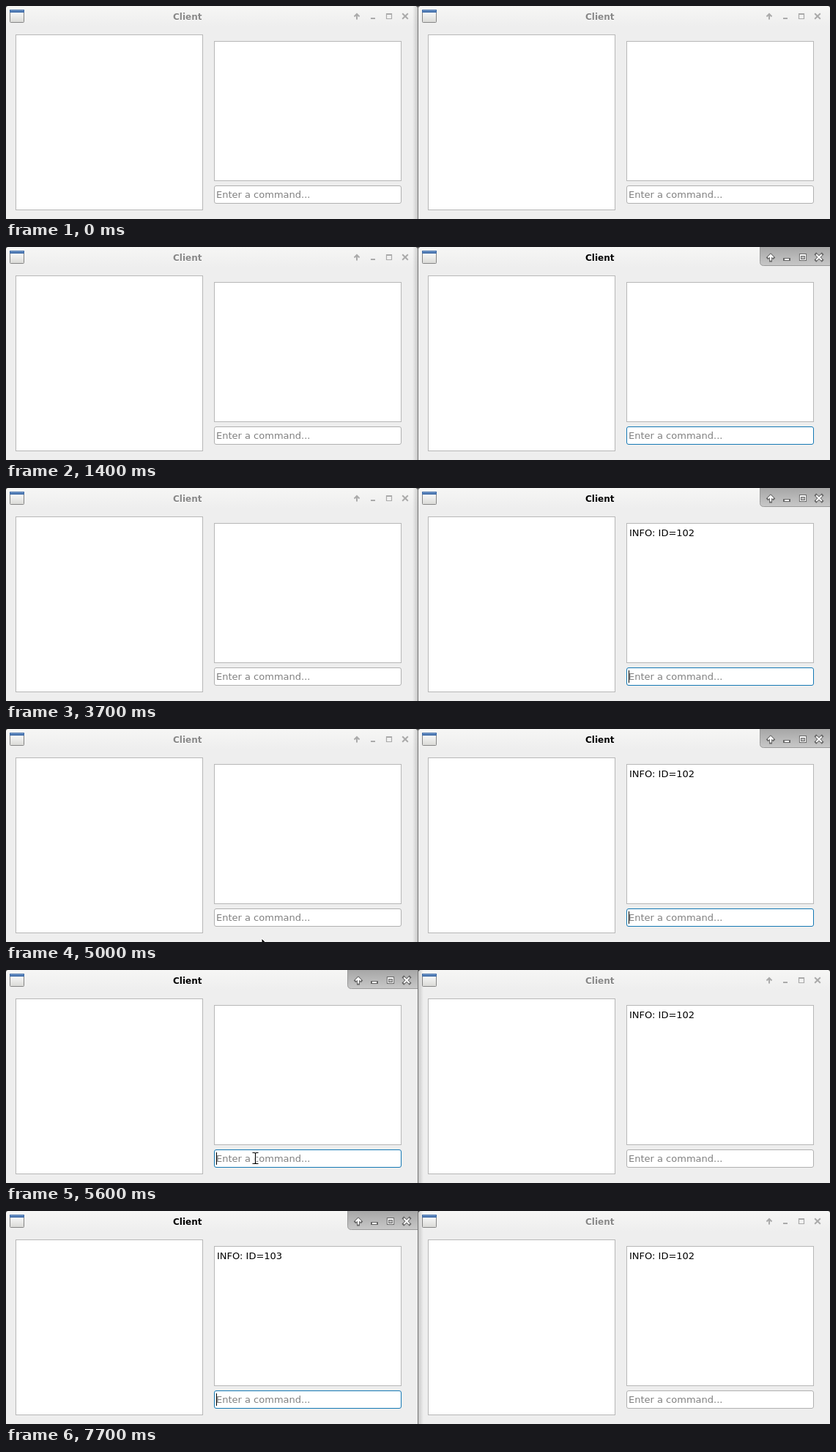
These frames come from a looping animation (1125 by 292 pixels, 8 s). An HTML page:

```html
<!DOCTYPE html>
<html lang="en">
<head>
<meta charset="utf-8">
<title>Two clients</title>
<style>
  html, body { margin: 0; width: 100%; height: 100%; overflow: hidden; background: #eee; }
  svg { display: block; width: 1125px; height: 292px; }
  text { font: 13px "DejaVu Sans", sans-serif; white-space: pre; }
  .title { font-weight: bold; font-size: 12px; }
</style>
</head>
<body>
<svg id="stage" viewBox="0 0 1125 292" xmlns="http://www.w3.org/2000/svg">
  <defs>
    <linearGradient id="bar" x2="0" y2="1">
      <stop offset="0" stop-color="#f6f6f5"/><stop offset="1" stop-color="#eee"/>
    </linearGradient>
    <linearGradient id="tab" x2="0" y2="1">
      <stop offset="0" stop-color="#a6a6a6"/><stop offset="1" stop-color="#c8c8c8"/>
    </linearGradient>
    <linearGradient id="pane" x2="0" y2="1">
      <stop offset="0" stop-color="#fff"/><stop offset="1" stop-color="#d9d9d6"/>
    </linearGradient>
    <linearGradient id="shade">
      <stop offset="0" stop-color="#000" stop-opacity=".16"/><stop offset="1" stop-color="#000" stop-opacity="0"/>
    </linearGradient>
  </defs>
  <rect width="1125" height="292" fill="#4c4c4c"/>
</svg>
<script>
const LOOP = 8000, STEP = 100, WINDOW_X = 563;
const stage = document.getElementById('stage');

function add(parent, tag, attrs, content) {
  const node = document.createElementNS('http://www.w3.org/2000/svg', tag);
  for (const key in attrs) node.setAttribute(key, attrs[key]);
  if (content) node.textContent = content;
  parent.appendChild(node);
  return node;
}

const show = (node, on) => node.setAttribute('visibility', on ? 'visible' : 'hidden');
const inside = (t, spans) => spans.some(([from, to]) => t >= from && t < to);

function drawButtons(parent, x, color, active) {
  const group = add(parent, 'g', { transform: `translate(${x} 14)` });
  const shapes = [
    'M0 4.5V-2.5M-3.5 0.5L0 -3L3.5 0.5',
    'M19 3H25',
    'M40.5 -3.5H47.5V3.5H40.5ZM40.5 -2.5H47.5',
    'M62.2 -3.8L69.8 3.8M69.8 -3.8L62.2 3.8'
  ];
  shapes.forEach((d, i) => {
    const width = i === 2 ? 1.2 : 2;
    if (active) add(group, 'path', { d, fill: 'none', stroke: '#686868', 'stroke-width': width + 2, 'stroke-linecap': 'square' });
    add(group, 'path', { d, fill: 'none', stroke: color, 'stroke-width': width });
  });
}

function drawBox(parent, x, y, width, height, radius, stroke) {
  return add(parent, 'rect', { x: x + .5, y: y + .5, width: width - 1, height: height - 1, rx: radius, fill: '#fff', stroke });
}

function createWindow(x) {
  const g = add(stage, 'g', { transform: `translate(${x} 0)` });
  add(g, 'path', { d: 'M0 292V4Q0 0 4 0H558Q562 0 562 4V292Z', fill: '#eee' });
  add(g, 'path', { d: 'M0 28V4Q0 0 4 0H558Q562 0 562 4V28Z', fill: 'url(#bar)' });

  add(g, 'rect', { x: 5.5, y: 5.5, width: 19, height: 17, rx: 1, fill: 'url(#pane)', stroke: '#858585' });
  add(g, 'rect', { x: 5, y: 5, width: 20, height: 4, fill: '#3f6ca8' });
  add(g, 'rect', { x: 6, y: 6, width: 18, height: 1, fill: '#7fa3d1' });

  add(g, 'text', { class: 'title', x: 228, y: 20, fill: '#fff' }, 'Client');
  const title = add(g, 'text', { class: 'title', x: 228, y: 19 }, 'Client');

  const idle = add(g, 'g', {});
  drawButtons(idle, 479, '#aaa', false);
  const active = add(g, 'g', {});
  add(active, 'path', { d: 'M466.5 0V20.500Q466.500 25.500 471.500 25.500H562V0Z', fill: 'url(#tab)' });
  add(active, 'path', { d: 'M466.5 0V20.500Q466.500 25.500 471.500 25.500H562', fill: 'none', stroke: '#9a9a9a' });
  drawButtons(active, 481, '#fff', true);

  drawBox(g, 13, 39, 256, 241, 0, '#b7b7b7');
  drawBox(g, 284, 48, 256, 192, 0, '#b7b7b7');
  const log = add(g, 'text', { x: 288, y: 66 });
  const field = drawBox(g, 284, 246, 256, 25, 2.5, '#b0b0b0');
  const hint = add(g, 'text', { x: 287, y: 263, fill: '#808080' }, 'Enter a command...');
  const typed = add(g, 'text', { x: 287, y: 263 });
  const caret = add(g, 'rect', { y: 250, width: 1, height: 17 });

  return state => {
    title.setAttribute('fill', state.focus ? '#000' : '#888');
    show(idle, !state.focus);
    show(active, state.focus);
    field.setAttribute('stroke', state.focus ? '#1478b4' : '#b0b0b0');
    log.textContent = state.log;
    typed.textContent = state.typed;
    show(hint, !state.typed);
    show(caret, state.caret);
    caret.setAttribute('x', 287 + [0, 4, 14, 21, 31][state.typed.length]);
  };
}

const updateLeft = createWindow(0);
const updateRight = createWindow(WINDOW_X);
const shadeLeft = add(stage, 'rect', { x: -562, width: 7, height: 292, fill: 'url(#shade)', transform: 'scale(-1 1)' });
const shadeRight = add(stage, 'rect', { x: 563, width: 7, height: 292, fill: 'url(#shade)' });
add(stage, 'rect', { x: 562, width: 1, height: 292, fill: '#747474' });

const beam = add(stage, 'g', {});
const beamPath = 'M-3.5 -7.500H-1Q.5 -7.500 .5 -6V6Q.5 7.500 -1 7.500H-3.500M4.500 -7.500H2Q.5 -7.500 .5 -6M.5 6Q.5 7.500 2 7.500H4.500';
add(beam, 'path', { d: beamPath, fill: 'none', stroke: '#fff', 'stroke-width': 2.6 });
add(beam, 'path', { d: beamPath, fill: 'none', stroke: '#000', 'stroke-width': 1.1 });
const arrow = add(stage, 'path', { d: 'M0 0V15L3.500 11.800L6 17.500L8.500 16.400L6 11H11Z', fill: '#000', stroke: '#fff' });

// Each visit glides in, rests over the field, then drops out below.
const visits = [
  { start: 200, arrive: 600, leave: 900, end: 1000, from: [905, 288], rest: [896, 263], exit: [896, 287] },
  { start: 5000, arrive: 5400, leave: 5800, end: 5900, from: [349, 287], rest: [340, 258], exit: [341, 276] }
];

function pointerAt(t) {
  const visit = visits.find(v => t >= v.start && t < v.end);
  if (!visit) return null;
  if (t >= visit.leave) return visit.exit;
  const p = Math.min(1, (t - visit.start) / (visit.arrive - visit.start));
  const eased = 1 - (1 - p) ** 2;
  return visit.from.map((a, i) => Math.round(a + (visit.rest[i] - a) * eased));
}

function typedAt(t, keys, enter) {
  return t < enter ? 'INFO'.slice(0, keys.filter(time => t >= time).length) : '';
}

function render(time) {
  const t = Math.floor(time % LOOP / STEP) * STEP;
  const leftOnTop = t >= 5600;
  updateLeft({
    focus: leftOnTop,
    log: t >= 7700 ? 'INFO: ID=103' : '',
    typed: typedAt(t, [6800, 7000, 7200, 7300], 7700),
    caret: inside(t, [[5600, 6200], [6800, LOOP]])
  });
  updateRight({
    focus: t >= 700 && !leftOnTop,
    log: t >= 3700 ? 'INFO: ID=102' : '',
    typed: typedAt(t, [2500, 2700, 2800, 3000], 3700),
    caret: inside(t, [[700, 1400], [2000, 3600], [3700, 4400], [5000, 5600]])
  });
  show(shadeLeft, !leftOnTop);
  show(shadeRight, leftOnTop);

  const point = pointerAt(t);
  const overField = point !== null && point[1] < 271;
  show(beam, overField);
  show(arrow, point !== null && !overField);
  if (point) (overField ? beam : arrow).setAttribute('transform', `translate(${point})`);
}

const started = performance.now();
function tick() {
  render(performance.now() - started);
  requestAnimationFrame(tick);
}
tick();
</script>
</body>
</html>
```
